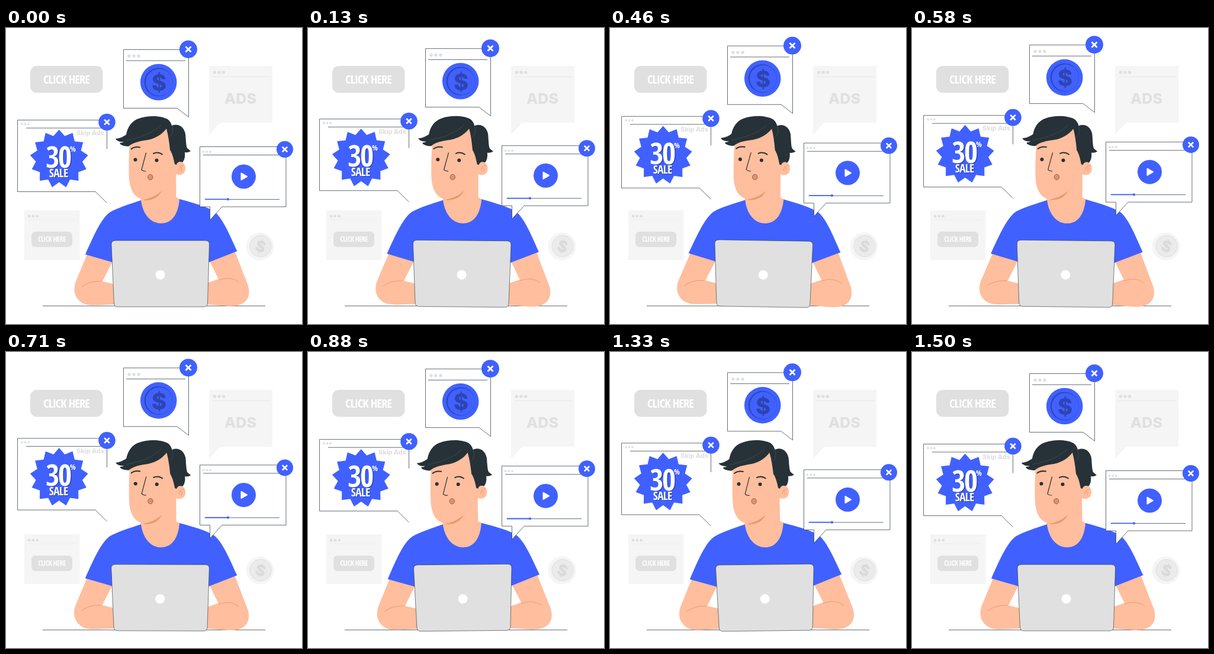
An HTML page that plays this animation: 500x500 px, repeating every 1.54 s.

```html
<!DOCTYPE html>
<html lang="en">
<head>
<meta charset="utf-8">
<title>Pop-up ads</title>
<style>
  html, body { margin: 0; width: 100%; height: 100%; overflow: hidden; background: #fff; }
  svg { display: block; width: 100vw; height: 100vh; }
  text { font: 800 25px Inter, 'Open Sans', sans-serif; }
  .slim {
    font-family: 'Open Sans Condensed', 'Roboto Condensed', 'Noto Sans', 'Open Sans', sans-serif;
    font-weight: 700; font-stretch: 62.5%; text-anchor: middle;
  }
  .mid { text-anchor: middle; }
  .blue { fill: #4061ff; }
  .deep { fill: #2d44b2; }
  .white { fill: #fff; }
  .skin { fill: #ffbe9d; }
  .dark { fill: #263238; }
  .pale { fill: #f5f5f5; }
  .grey { fill: #e0e0e0; }
  .line { fill: none; stroke: #263238; stroke-width: .7; }
  .fold { fill: none; stroke: #e4936c; stroke-width: .8; stroke-linecap: round; }
  .face { fill: none; stroke: #263238; stroke-linecap: round; stroke-linejoin: round; }
</style>
</head>
<body>
<svg viewBox="0 0 500 500" xmlns="http://www.w3.org/2000/svg">
  <g id="back">
    <rect class="grey" x="41" y="64" width="122.5" height="45.5" rx="11"/>
    <text class="slim white" x="102" y="94" style="font-size:20.5px;letter-spacing:-1px">CLICK HERE</text>

    <path class="pale" d="M343 64H450V160H362L343 180Z"/>
    <path d="M349 82.5H447" stroke="#e6e6e6"/>
    <text class="grey mid" x="396" y="128">ADS</text>

    <rect class="pale" x="31" y="308" width="93.5" height="84"/>
    <path d="M38 324H117" stroke="#ebebeb"/>
    <rect class="grey" x="43" y="344" width="69" height="26" rx="6.5"/>
    <text class="slim white" x="77.5" y="361" style="font-size:11.8px;letter-spacing:-.4px">CLICK HERE</text>

    <circle class="pale" cx="429" cy="369" r="23.5"/>
    <circle cx="430" cy="368.5" r="18.5" fill="#ebebeb"/>
    <circle cx="430" cy="368.5" r="18" fill="none" stroke="#e0e0e0"/>
    <text class="mid" transform="translate(430 369) rotate(18)" y="9" style="font-size:26px" fill="#dadada">$</text>
    <path class="line" d="M62 469.5H438"/>
  </g>

  <g id="man">
    <path class="skin" d="M232 270L227 291C230 314 244 332 262 332C280 332 292 315 294 289L287.500 286L287 225Z"/>
    <path class="skin" d="M209 190C207.500 213 207 245 208.500 259C211 277 219 288 234 290C254 290 280 270 287 240L286 200L276 165L240 180Z"/>
    <path d="M233 290C246 287 256 282 263 275C259 285 248 292 232 291Z" fill="#eb996e"/>
    <path class="skin" d="M286 229C294 223 303 227 303 237C303 246 296 250 287 247Z"/>
    <path class="fold" d="M292 240C293 234 296 231 300 232M294 235C297 236 298 239 296 242"/>
    <path class="dark" d="M185 187C192 187 199 183 203 180C205 168 212 157 224 153C240 147 262 148 273 154C277 157 279 161 280 165C292 160 301 168 303 179C304 190 304 198 306 203L312 208Q307 211 302 210C303 218 301 224 298 227C294 225 289 226 288 231L285 230C283 220 281 212 277 206C276 194 274 181 271 170C264 179 254 186 240 189C226 191 215 193 207 200C198 200 190 196 193 194Q197 194 199 192C193 193 187 191 185 187Z"/>
    <path d="M203 190C225 186 248 178 262 164M276 184C281 181 283 176 280 165" fill="none" stroke="#455a64" stroke-width=".6"/>
    <path class="face" stroke-width="2" d="M211.500 204.500Q217 200 226 201.500M249 212Q257 208.500 264 213.500"/>
    <path class="face" stroke-width="1.2" d="M236.500 211L229 239.500Q231 242 236 242"/>
    <circle class="dark" cx="218.500" cy="222.500" r="3"/>
    <circle class="dark" cx="254.500" cy="223.500" r="3"/>
    <ellipse cx="243.800" cy="252" rx="4.2" ry="4.6" fill="#e0916b" stroke="#8a5540" stroke-width=".8"/>

    <path class="skin" d="M138 380L118 428C112 444 117 458 130 465C138 469 150 468.500 160 468L184 467V433L163 428L180 394Z"/>
    <path class="skin" d="M386 376L407 430C414 446 411 461 396 467C387 470.500 375 470 366 469L339 467V431L359 424L343 392Z"/>
    <path class="fold" d="M128 437Q141 427 161 428M359 426Q379 418 393 429"/>
    <path class="blue" d="M228 291C210 297 188 304 176 311C161 321 148 351 134 382.500L181 396H342L390.500 377C378 350 366 321 352 310C340 302 316 295 293 289C291 315 280 330 262 330C244 330 231 314 228 291Z"/>

    <path class="grey" stroke="#263238" stroke-width=".6" d="M185 359H336.500Q344 359 343.500 366L340.500 465Q340 471 334 471H189Q183 471 182.500 465L178 366Q177.500 359 185 359Z"/>
    <circle class="white" cx="260.500" cy="417" r="8"/>
  </g>

  <g id="ads">
    <g id="coin">
      <path class="white" d="M198.500 36.500H308.500V150.500L289 135.500H198.500Z"/>
      <path class="line" d="M198.500 36.500H308.500V150.500L289 135.500H198.500ZM203 55.200H303"/>
      <circle class="blue" cx="257.700" cy="91.500" r="30.800"/>
      <circle class="deep" cx="257.700" cy="91.500" r="24"/>
      <circle class="blue" cx="258.700" cy="91.800" r="22.800"/>
      <text class="deep mid" x="258.500" y="106.300" style="font-size:38px">$</text>
    </g>

    <g id="sale">
      <path class="white" d="M19.500 155.500H170.500V295.500L151 276.500H19.500Z"/>
      <path class="line" d="M170.500 204.500V155.500H19.500V276.500H151L170.500 295.500M34 169H162"/>
      <text class="grey" x="119" y="181" style="font-size:10.8px">Skip Ads</text>
      <path class="blue" id="burst"/>
      <g id="shade" class="deep" transform="translate(1.500 1)"></g>
      <g id="label" class="white"></g>
    </g>

    <g id="video">
      <path class="white" d="M327.500 200.500H473V302H365L344.500 324.500V302H327.500Z"/>
      <path class="line" d="M327.500 200.500H473V302H365L344.500 324.500V302H327.500ZM333 214.500H468M336 289.500H462"/>
      <circle class="blue" cx="401.500" cy="251" r="20.500"/>
      <path d="M397.500 245.500L407 251L397.500 256.500Z" fill="#fff" stroke="#fff" stroke-width="2" stroke-linejoin="round"/>
      <path d="M336.500 289.300H375" stroke="#4061ff" stroke-width="1.800" stroke-linecap="round"/>
      <circle class="blue" cx="375" cy="289.300" r="2.100"/>
    </g>
  </g>
</svg>
<script>
  const LOOP = 1540, CYCLE = 1500, PEAK = 740, RISE = 10;
  const $ = id => document.getElementById(id);
  const add = (id, markup) => $(id).insertAdjacentHTML('beforeend', markup);

  function dots(id, x, y, gap, r) {
    for (let i = 0; i < 3; i++)
      add(id, `<circle class="grey" cx="${x + i * gap}" cy="${y}" r="${r}"/>`);
  }

  function closer(id, x, y, r) {
    const k = r * .3;
    add(id, `<g transform="translate(${x} ${y})"><circle class="blue" r="${r}"/>` +
      `<path d="M${-k} ${-k}L${k} ${k}M${k} ${-k}L${-k} ${k}" stroke="#fff" stroke-width="${r * .19}"/></g>`);
  }

  function star(x, y, tips, outer, inner) {
    const pts = Array.from({ length: tips * 2 }, (_, i) => {
      const a = i * Math.PI / tips, r = i % 2 ? inner : outer;
      return (x + r * Math.sin(a)).toFixed(1) + ' ' + (y - r * Math.cos(a)).toFixed(1);
    });
    return 'M' + pts.join('L') + 'Z';
  }

  dots('back', 352.5, 75, 7.5, 2.8);
  dots('back', 39, 318, 6.8, 2.4);
  dots('coin', 208, 47.5, 8, 2.7);
  dots('sale', 27, 162.2, 5.5, 1.9);
  dots('video', 333.5, 209, 5.7, 1.9);
  closer('coin', 308, 36, 15);
  closer('sale', 170.5, 159, 14.3);
  closer('video', 471, 205, 14);

  $('burst').setAttribute('d', star(89.7, 221, 13, 49.3, 39.5));
  const words = [['30', 88, 236, 50, -2.5], ['%', 113, 209, 13, 0], ['SALE', 88.7, 252, 19.5, -.7]];
  for (const id of ['shade', 'label'])
    for (const [word, x, y, size, gap] of words) {
      if (id === 'shade' && word === '%') continue;
      add(id, `<text class="slim" x="${x}" y="${y}" style="font-size:${size}px;letter-spacing:${gap}px">${word}</text>`);
    }

  // Windows climb evenly, then sink with a soft landing.
  const lift = t => t < PEAK
    ? RISE * t / PEAK
    : RISE * Math.pow((CYCLE - t) / (CYCLE - PEAK), 1.2);

  function draw(ms) {
    const t = Math.min(ms % LOOP, CYCLE);
    const sway = Math.sin(2 * Math.PI * t / CYCLE);
    $('ads').setAttribute('transform', `translate(0 ${-lift(t)})`);
    $('man').setAttribute('transform', `rotate(${sway} 260 308)`);
  }

  const start = performance.now();
  function tick() {
    draw(performance.now() - start);
    requestAnimationFrame(tick);
  }
  draw(0);
  requestAnimationFrame(tick);
</script>
</body>
</html>
```
